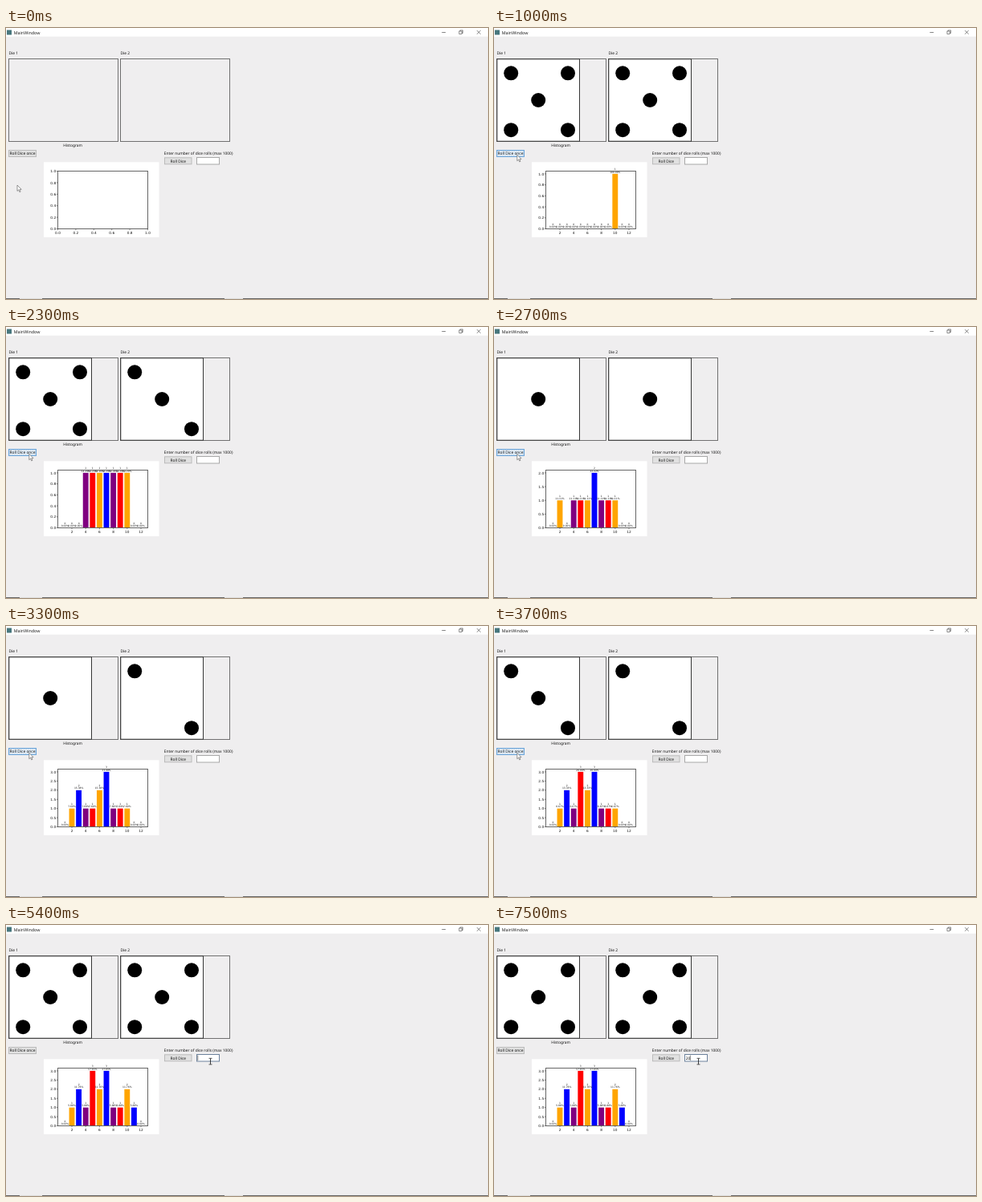
An HTML page with a canvas for the animation above (8000 ms loop, 600 by 338 pixels).

```html
<!DOCTYPE html>
<html lang="en">
<head>
<meta charset="utf-8">
<title>Dice roller</title>
<style>
  html, body { margin: 0; width: 100%; height: 100%; overflow: hidden; background: #efeeef; }
  canvas { display: block; width: 600px; height: 338px; }
</style>
</head>
<body>
<canvas id="stage"></canvas>
<script>
const LOOP = 8000;
const UI_FONT = '"Noto Sans", sans-serif';
const TITLE_FONT = '"Open Sans", sans-serif';
const PLOT_FONT = '"DejaVu Sans", sans-serif';
const BAR_COLORS = ['purple', 'red', 'orange', 'blue'];
const PLOT = { left: 64.5, right: 176.5, top: 178.5, bottom: 250.5 };

// Evenly spaced clicks, each with the sum of the two dice.
const CLICKS = [
  { from: 1000, every: 500, sums: [10, 5] },
  { from: 1700, every: 300, sums: [6, 4] },
  { from: 2000, every: 100, sums: [7, 9] },
  { from: 2300, every: 200, sums: [8, 7, 2, 3, 6] },
  { from: 3200, every: 100, sums: [7, 3] },
  { from: 3500, every: 200, sums: [5, 5, 11, 10] }
];
const ROLLS = CLICKS.flatMap(({ from, every, sums }) =>
  sums.map((sum, i) => ({ time: from + i * every, sum })));

const MOVES = [
  { from: 0, to: 800, x: 28.8, y: 158.3 },
  { from: 4100, to: 4300, x: 223, y: 150 },
  { from: 4300, to: 4800, x: 254.5, y: 170 }
];

const canvas = document.getElementById('stage');
const ctx = canvas.getContext('2d');
const ratio = window.devicePixelRatio || 1;
canvas.width = 600 * ratio;
canvas.height = 338 * ratio;
ctx.scale(ratio, ratio);

function box(x, y, w, h, fill, stroke, width = 1) {
  if (fill) { ctx.fillStyle = fill; ctx.fillRect(x, y, w, h); }
  if (stroke) { ctx.strokeStyle = stroke; ctx.lineWidth = width; ctx.strokeRect(x, y, w, h); }
}

function line(points, color, width = 0.6) {
  ctx.beginPath();
  points.forEach(([x, y]) => ctx.lineTo(x, y));
  ctx.strokeStyle = color;
  ctx.lineWidth = width;
  ctx.stroke();
}

function text(label, x, y, size = 4.86, family = UI_FONT, align = 'left') {
  ctx.font = `${size}px ${family}`;
  ctx.textRendering = 'geometricPrecision';
  ctx.textAlign = align;
  ctx.fillStyle = '#111';
  ctx.fillText(label, x, y);
}

function button(label, x, y, w, hover, focus) {
  const border = hover ? '#69a5dc' : focus ? '#9db4ca' : '#bbb';
  box(x, y, w, 8, hover ? '#e3effa' : '#e1e1e1', border);
  if (focus) {
    ctx.setLineDash([0.8, 0.8]);
    box(x + 1, y + 1, w - 2, 6, null, '#8496a8', 0.4);
    ctx.setLineDash([]);
  }
  text(label, x + w / 2, y + 5.9, 4.86, UI_FONT, 'center');
}

function windowFrame() {
  box(0, 0, 600, 338, '#efeeef');
  box(0, 0, 600, 10.7, '#fff');
  box(1, 2.5, 6, 6, '#47777d');
  text('MainWindow', 9.7, 7.5, 5.36, TITLE_FONT);
  line([[542.5, 5.5], [547.3, 5.5]], '#333');
  box(564, 4, 3.5, 3.5, null, '#444', 0.6);
  line([[565.2, 4], [565.2, 2.9], [568.7, 2.9], [568.7, 6.4], [567.5, 6.4]], '#444');
  line([[586.2, 3], [590.8, 7.6]], '#333');
  line([[590.8, 3], [586.2, 7.6]], '#333');
  box(0, 337, 600, 1, '#666');
  box(17, 337, 28, 1, '#ddd');
  box(272, 337, 23, 1, '#ddd');
}

function die(x, value) {
  box(x, 38.5, 136, 103, null, '#707070');
  if (!value) return;
  box(x + 0.3, 38.8, 102.7, 102.4, '#fff', '#222', 0.9);
  const [left, mid, right] = [17.7, 51.7, 88.5].map(dx => x + dx);
  const dots = [];
  if (value % 2) dots.push([mid, 90]);
  if (value > 1) dots.push([left, 56.3], [right, 127.2]);
  if (value > 3) dots.push([right, 56.3], [left, 127.2]);
  if (value === 6) dots.push([left, 90], [right, 90]);
  ctx.fillStyle = '#000';
  for (const [cx, cy] of dots) {
    ctx.beginPath();
    ctx.arc(cx, cy, 9, 0, 7);
    ctx.fill();
  }
}

// Splits a sum into two faces, leaning towards a high first die.
function faces(sum) {
  const low = Math.max(1, sum - 6), high = Math.min(6, sum - 1);
  const first = Math.floor(low + 0.75 * (high - low));
  return [first, sum - first];
}

function xTick(x, label) {
  line([[x, PLOT.bottom], [x, PLOT.bottom + 1.8]], '#222', 0.5);
  text(label, x, 257.4, 4.25, PLOT_FONT, 'center');
}

function yTick(y, label) {
  line([[PLOT.left - 1.8, y], [PLOT.left, y]], '#222', 0.5);
  text(label, 62.1, y + 1.6, 4.25, PLOT_FONT, 'right');
}

function histogram(rolls) {
  const { left, right, top, bottom } = PLOT;
  box(47, 167.3, 143.5, 93.7, '#fff');
  const counts = Array(13).fill(0);
  rolls.forEach(({ sum }) => counts[sum]++);
  const peak = Math.max(...counts);
  const limit = peak ? peak * 1.05 : 1;
  const step = peak > 1 ? 0.5 : 0.2;
  const yOf = value => bottom - value / limit * (bottom - top);
  const xOf = sum => 64.8 + 8.6 * sum;

  for (let sum = 2; sum <= 12; sum++) {
    const y = yOf(counts[sum]);
    box(xOf(sum) - 3.44, y, 6.88, bottom - y, BAR_COLORS[sum % 4]);
  }
  box(left, top, right - left, bottom - top, null, '#666');
  for (let i = 0; i * step <= limit + 1e-6; i++) yTick(yOf(i * step), (i * step).toFixed(1));

  if (!peak) {
    for (let i = 0; i <= 5; i++) xTick(left + i * (right - left) / 5, (i / 5).toFixed(1));
    return;
  }
  for (let sum = 1; sum <= 12; sum++) {
    const x = xOf(sum), y = yOf(counts[sum]);
    if (sum % 2 === 0) xTick(x, sum);
    text(counts[sum], x, y - 4.6, 3, PLOT_FONT, 'center');
    text((counts[sum] / rolls.length * 100).toFixed(2) + '%', x, y - 1.3, 3, PLOT_FONT, 'center');
  }
}

function inputField(t, hover) {
  box(237.5, 161.5, 28, 8.5, '#fff', hover ? '#6d829c' : '#a8a8a8');
  const value = '20'.slice(0, t < 7300 ? 0 : t < 7500 ? 1 : 2);
  text(value, 238.7, 167.7);
  const caretOn = value || (t >= 5400 && (t - 5400) % 1000 < 500);
  if (caretOn) {
    const x = 238.8 + ctx.measureText(value).width;
    line([[x, 162.5], [x, 169]], '#111', 0.5);
  }
}

function arrow(x, y) {
  ctx.save();
  ctx.translate(x, y);
  const outline = new Path2D('M0 0V7.4L1.7 5.8 2.9 8.6 4.1 8.1 2.9 5.4 5.2 5.3Z');
  ctx.fillStyle = '#fff';
  ctx.fill(outline);
  ctx.strokeStyle = '#444';
  ctx.lineWidth = 0.55;
  ctx.stroke(outline);
  ctx.restore();
}

function textPointer(x, y) {
  line([[x, y - 3.5], [x, y + 3.7]], '#111', 0.8);
  for (const dy of [-3.7, 3.9]) line([[x - 2, y + dy], [x + 2, y + dy]], '#111', 0.7);
}

// The pointer moves in steps of 100 ms and slows down towards each stop.
function pointerAt(t) {
  const now = Math.floor(t / 100) * 100;
  let x = 14, y = 196;
  for (const move of MOVES) {
    const part = Math.min(1, Math.max(0, (now - move.from) / (move.to - move.from)));
    const eased = 1 - (1 - part) ** 3;
    x += (move.x - x) * eased;
    y += (move.y - y) * eased;
  }
  return [x, y];
}

function draw(t) {
  const rolls = ROLLS.filter(({ time }) => time <= t);
  const [first, second] = rolls.length ? faces(rolls[rolls.length - 1].sum) : [];
  const [px, py] = pointerAt(t);
  const overRoll = px < 38 && py < 161;
  const overField = px > 238 && py >= 161;

  windowFrame();
  text('Die 1', 3.5, 32.9);
  text('Die 2', 142.5, 32.9);
  die(3.5, first);
  die(142.5, second);
  text('Histogram', 83.1, 148.1, 4.8, UI_FONT, 'center');
  histogram(rolls);
  button('Roll Dice once', 3.5, 152.5, 34, overRoll, t >= 1000 && t < 5400);
  text('Enter number of dice rolls (max 1000)', 196.8, 158.3);
  button('Roll Dice', 197.5, 161.8, 33.5, false, false);
  inputField(t, overField);
  (overField ? textPointer : arrow)(px, py);
}

const start = performance.now();
function tick() {
  draw((performance.now() - start) % LOOP);
  requestAnimationFrame(tick);
}
tick();
</script>
</body>
</html>
```
